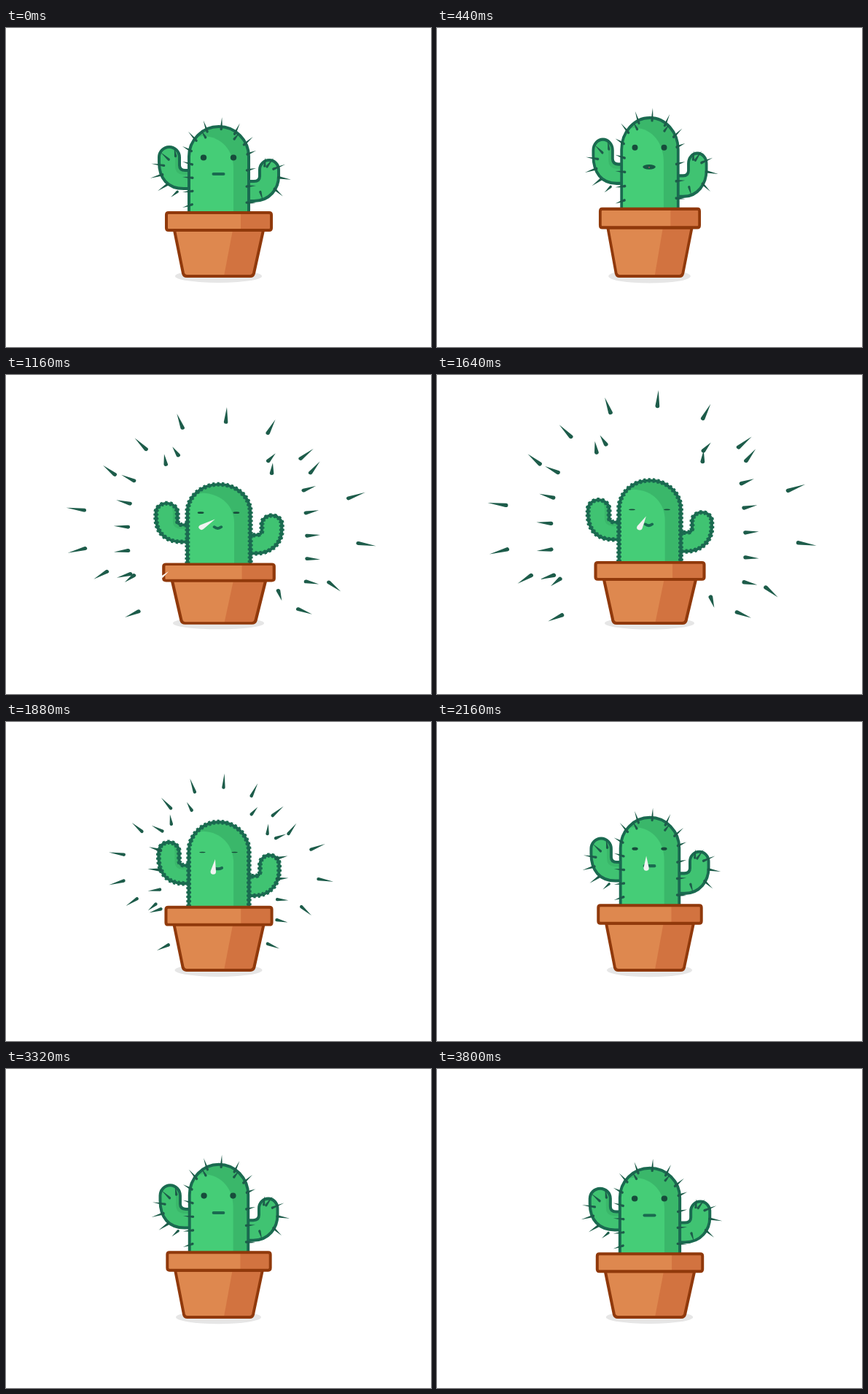
An HTML page with a canvas that plays this animation: 583 by 437 pixels, repeating every 3840 ms.

```html
<!DOCTYPE html>
<html lang="en">
<head>
<meta charset="utf-8">
<title>Sneezing cactus</title>
<style>
  html, body { margin: 0; width: 100%; height: 100%; overflow: hidden; background: #fff; }
  canvas { display: block; }
</style>
</head>
<body>
<canvas width="583" height="437"></canvas>
<script>
const ctx = document.querySelector('canvas').getContext('2d');
const LOOP = 3840, BURST = 1000, CX = 291.5, FLOOR = 340, DEG = Math.PI / 180;
const LINE = '#1a6a50', SPIKE = '#1d5c4a', LIGHT = '#45cd77', SHADE = '#3ab76a', ARM = '#40c372';
const CLAY = '#de884f', CLAY_SHADE = '#d27340', CLAY_LINE = '#90390b';

// Spikes sit on a curve place(u) and fly off at aim(u) degrees by reach(u), u from 0 to 1.
const spikes = [];
function fan(count, place, aim, reach) {
  for (let i = 0; i < count; i++) {
    const u = i / (count - 1), [x, y] = place(u);
    spikes.push({ x, y, angle: aim(u) * DEG, reach: reach(u) });
  }
}
const around = (x, y, r, deg) => [x + r * Math.cos(deg * DEG), y + r * Math.sin(deg * DEG)];
const armReach = u => 86 + 40 * Math.sin(Math.PI * u);

fan(5, u => around(292, 176, 54, -141 + 111 * u), u => -132 + 91 * u, u => 117);        // crown
fan(2, u => around(292, 176, 43, -124 + 75 * u), u => -121 + 71 * u, u => 82);          // brow
fan(5, u => [242, 162 + 84 * u], u => -152 - 46 * u, u => 101);                         // left side
fan(5, u => [343, 168 + 96 * u], u => -22 + 35 * u, u => 94);                           // right side
fan(6, u => around(231, 198, 34, -90 - 172 * u), u => -98 - 122 * (1 - (1 - u) ** 1.8), armReach);
fan(6, u => around(361, 207, 30, -100 + 207 * u ** 1.4), u => -85 + 158 * u, armReach);
fan(2, u => [252 + 77 * u, 291], u => 154 - 131 * u, u => 106);                         // behind the pot

const shape = d => new Path2D(d);
const leftArm = shape('M251 220H244C222 220 210 206 210 184V177A14 14 0 0 1 238 177V188Q238 195 246 195H251');
const leftArmShade = shape('M226 164Q238 167 238 177V188Q238 195 246 195H251V201H243Q232 200 232 190V177Q232 168 226 164');
const rightArm = shape('M333 237H340C362 237 374 220 374 203V194A13 13 0 0 0 348 194V203Q348 210 340 210H333');
const trunk = shape('M251 258V176A41 41 0 0 1 333 176V258');
const trunkLight = shape('M251 258V176Q251 148 271 148C296 149 312 168 312 192V258Z');
const pot = shape('M231 277L243 336Q244 340 248 340H335Q339 340 340 336L353 277Z');
const potShade = shape('M311 277L299 340H335Q339 340 340 336L353 277Z');
const rim = shape('M223 253H361Q364 253 364 256V274Q364 277 361 277H223Q220 277 220 274V256Q220 253 223 253Z');
const rimShade = shape('M322 253H361Q364 253 364 256V274Q364 277 361 277H322Z');

// Smoothly eased value through time/value pairs.
function key(t, ...k) {
  if (t <= k[0]) return k[1];
  for (let i = 2; i < k.length; i += 2) {
    if (t < k[i]) {
      const u = (t - k[i - 2]) / (k[i] - k[i - 2]);
      return k[i - 1] + (k[i + 1] - k[i - 1]) * u * u * (3 - 2 * u);
    }
  }
  return k[k.length - 1];
}

function fill(path, color) {
  ctx.fillStyle = color;
  ctx.fill(path);
}

function stroke(path, color, width = 4) {
  ctx.strokeStyle = color;
  ctx.lineWidth = width;
  ctx.stroke(path);
}

function oval(x, y, rx, ry, color) {
  const path = new Path2D();
  path.ellipse(x, y, rx, ry, 0, 0, 7);
  fill(path, color);
}

// Pointed at x, y; round at the far end.
function drop(x, y, angle, length, r, color) {
  ctx.save();
  ctx.translate(x, y);
  ctx.rotate(angle);
  const path = shape('M0 0');
  path.arc(length - r, 0, r, -1.7, 1.7);
  path.closePath();
  fill(path, color);
  ctx.restore();
}

function outline(path, fuzzy) {
  stroke(path, LINE);
  if (!fuzzy) return;
  ctx.save();
  ctx.lineCap = 'butt';
  ctx.setLineDash([3, 3]);
  stroke(path, LINE, 6.6);
  ctx.restore();
}

function drawCactus(fuzzy) {
  fill(leftArm, ARM);
  fill(leftArmShade, SHADE);
  outline(leftArm, fuzzy);
  fill(rightArm, ARM);
  outline(rightArm, fuzzy);
  fill(trunk, SHADE);
  fill(trunkLight, LIGHT);
  outline(trunk, fuzzy);
}

function drawSpikes(out) {
  for (const { x, y, angle, reach } of spikes) {
    const far = reach * out, length = reach * (0.155 + 0.065 * out);
    drop(x + far * Math.cos(angle), y + far * Math.sin(angle), angle + Math.PI, length, 1.7 + 1.1 * out, SPIKE);
  }
}

function drawPot() {
  fill(pot, CLAY);
  fill(potShade, CLAY_SHADE);
  stroke(pot, CLAY_LINE);
  fill(rim, CLAY);
  fill(rimShade, CLAY_SHADE);
  stroke(rim, CLAY_LINE);
}

function drawFace(t) {
  const eyeY = key(t, 250, 177.5, 850, 161, 960, 161, 1120, 177);
  const spread = key(t, 250, 20.5, 850, 23.2, 1640, 23.2, 2160, 20.3);
  const eyeH = key(t, 350, 4, 850, 1.6, 1160, 1.5, 1640, 0.8, 2060, 0.8, 2300, 4);
  for (const side of [-1, 1]) oval(CX + side * spread, eyeY, 4.2, eyeH, '#174c3b');

  const open = key(t, 350, 0, 850, 1, 960, 1, 1080, 0);
  if (open > 0) {
    const y = 200 - 16 * open, mouth = new Path2D();
    mouth.ellipse(291, y, 8.5 + 9 * open, 2 + 13.5 * open, 0, 0, 7);
    fill(mouth, '#175a45');
    ctx.save();
    ctx.clip(mouth);
    oval(291, y + 7 * open, 11 * open, 6.5 * open, '#ff4c63');
    ctx.restore();
  } else {
    const smile = t < BURST ? 0 : key(t, 1750, 1, 2120, 0);
    const w = 7 - 2.5 * smile;
    stroke(shape(`M${CX - smile - w} ${200 - 2 * smile}q${w} ${4 * smile} ${2 * w} 0`), LINE);
  }
}

function drawSnot(t) {
  const length = key(t, BURST, 0, 1090, 25, 1640, 22, 2200, 20, 2440, 0);
  if (length < 1) return;
  const swing = key(t, 1000, 60, 1160, 56, 2120, 0);
  drop(287, 186.5, (90 + swing) * DEG, length, Math.min(3.7, length / 3), '#f1f3f1');
}

function drawSpray(t) {
  const u = (t - 1040) / 120;
  if (u > 0 && u < 2) drop(287 - 60 * u, 190 + 73 * u, 2.4, 13, 1.5, '#fff');
}

function draw(t) {
  const beat = t > 3640 ? t - LOOP : t;
  const stretch = key(beat, -200, -0.01, 900, 0.1, 960, 0.1, 1200, -0.085, 2280, 0.024, 2840, 0.024, 3360, 0.021, 3640, -0.01);
  const out = t < BURST ? 0 : (1 - Math.exp((BURST - t) / 80)) * key(t, 1630, 1, 2110, 0);

  ctx.setTransform(1, 0, 0, 1, 0, 0);
  ctx.clearRect(0, 0, 583, 437);
  ctx.translate(CX, FLOOR);
  ctx.scale(1 - 0.83 * stretch - 1.5 * stretch ** 2, 1 + stretch);
  ctx.translate(-CX, -FLOOR);
  ctx.lineCap = ctx.lineJoin = 'round';

  oval(CX, FLOOR, 59.5, 9, '#e6e6e6');
  drawCactus(out > 0.03);
  drawSpikes(out);
  drawFace(t);
  drawSnot(t);
  drawPot();
  drawSpray(t);
}

const start = performance.now();
function frame() {
  draw((performance.now() - start) % LOOP);
  requestAnimationFrame(frame);
}
frame();
</script>
</body>
</html>
```
